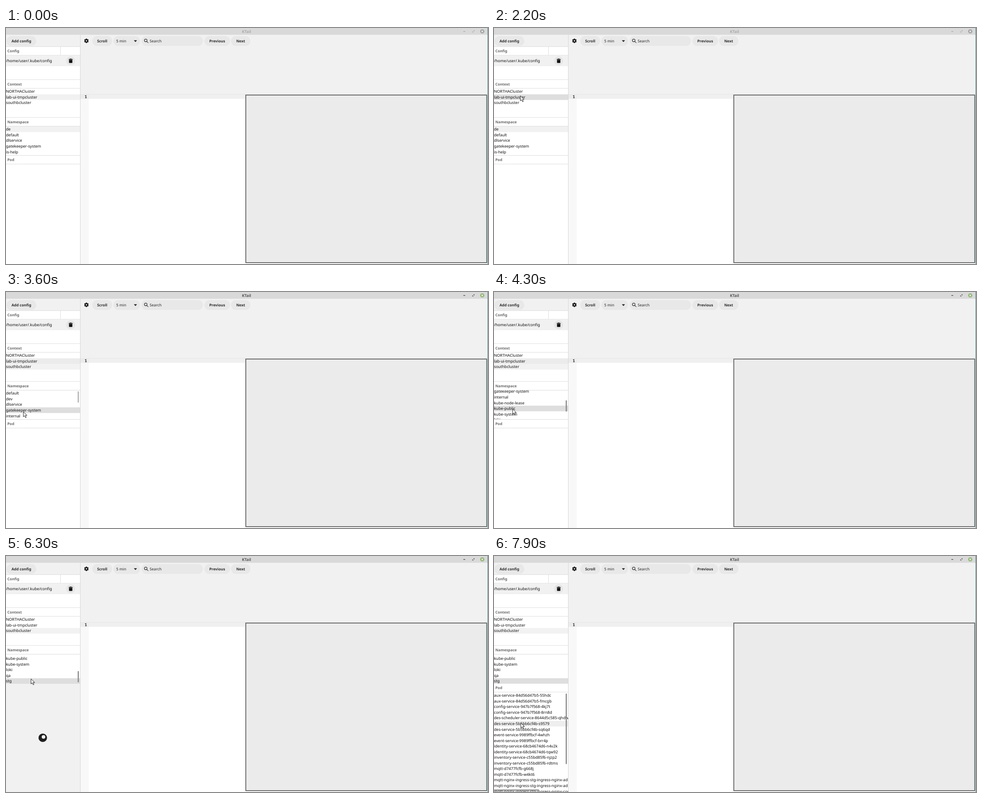
Recreate the animation shown at these times as an HTML page. Size 1067 by 525 pixels, loop 8000 ms.

```html
<!DOCTYPE html>
<html lang="en">
<head>
<meta charset="utf-8">
<title>Log viewer</title>
<style>
  html, body { margin: 0; width: 100%; height: 100%; overflow: hidden; background: #f1f1f1; }
  svg { display: block; }
  text { font: 8.65px "Noto Sans", "Open Sans", sans-serif; fill: #0c0c0c; text-rendering: geometricPrecision; white-space: pre; }
  .tool { font-size: 8.35px; fill: #222; }
  .strong { font-size: 8.2px; font-weight: 600; fill: #2b2b2b; }
  .head { font-size: 8.15px; font-weight: 600; fill: #686868; }
</style>
</head>
<body>
<svg width="1067" height="525" viewBox="0 0 1067 525">
  <defs>
    <clipPath id="nsClip"><rect y="219" width="164" height="64.5"/></clipPath>
    <clipPath id="podClip"><rect y="303" width="164" height="222"/></clipPath>
  </defs>
  <g id="chrome"></g>
  <g id="live"></g>
</svg>
<script>
const LOOP = 8000, STEP = 100, ROW = 12.55;
const CONTEXT_TOP = 135, NS_TOP = 219, POD_TOP = 303.9;
const HOVER = "#dedede";
const contexts = ["NORTHACluster", "lab-ui-tmpcluster", "southbcluster"];
const firstNamespaces = ["de", "default", "dlservice", "gatekeeper-system", "is-help"];
const namespaces = ["default", "dev", "dlservice", "gatekeeper-system", "internal", "kube-node-lease",
  "kube-public", "kube-system", "loki", "qa", "stg"];
const pods = ["aux-service-84d56d47b5-55hdc", "aux-service-84d56d47b5-fmcgb",
  "config-service-947b7f568-4kj7t", "config-service-947b7f568-8rn8d",
  "des-scheduler-service-8644d5c585-qhdwx", "des-service-5b5bb6cf4b-s9579", "des-service-5b5bb6cf4b-sq6qd",
  "event-service-9989ffbcf-4whzh", "event-service-9989ffbcf-brr4p",
  "identity-service-68cb4674d6-n4v2k", "identity-service-68cb4674d6-tqw92",
  "inventory-service-c55bd85f6-njzp2", "inventory-service-c55bd85f6-rdtms",
  "mqtt-d7477fcfb-g668j", "mqtt-d7477fcfb-w4kt6",
  "mqtt-nginx-ingress-stg-ingress-nginx-admission", "mqtt-nginx-ingress-stg-ingress-nginx-admission",
  "mqtt-nginx-ingress-stg-ingress-nginx-controller"];

// Keyframes: [time, ...values], linear in between
const cursorKeys = [[1400, 10, 163], [1700, 48, 158], [1800, 48, 158], [2200, 58, 150.5], [3100, 58, 150.5],
  [3300, 54, 170], [3600, 38, 266], [3700, 38, 265], [3800, 38, 265], [4300, 41, 260], [4400, 41, 260],
  [4700, 50, 260], [4800, 50, 260], [5000, 57, 261], [5600, 57, 261], [6100, 55, 273], [6500, 55, 273],
  [6600, 37, 275], [7100, 37, 275], [7900, 59, 371]];
const scrollKeys = [[3800, 0], [4300, 41.5], [4400, 41.5], [4700, 62], [4800, 62], [5000, 72.6]];
const overshootKeys = [[5200, 0], [5300, 20], [6000, 0]];
const nsBarKeys = [[3400, 0], [3700, 1], [6900, 1], [7000, 0], [7100, 0], [7200, .7], [7600, 0]];
const podBarKeys = [[7200, 0], [7500, 1]];

function track(keys, t) {
  const next = keys.findIndex(k => k[0] > t);
  if (next === 0) return keys[0].slice(1);
  if (next < 0) return keys[keys.length - 1].slice(1);
  const a = keys[next - 1], b = keys[next], p = (t - a[0]) / (b[0] - a[0]);
  return a.slice(1).map((v, i) => v + (b[i + 1] - v) * p);
}

const rect = (x, y, w, h, fill, extra = "") =>
  `<rect x="${x}" y="${y}" width="${w}" height="${h}" fill="${fill}" ${extra}/>`;
const text = (x, y, s, cls = "", extra = "") => `<text x="${x}" y="${y}" class="${cls}" ${extra}>${s}</text>`;
const circle = (x, y, r, fill) => `<circle cx="${x}" cy="${y}" r="${r}" fill="${fill}"/>`;
const path = (d, extra) => `<path d="${d}" ${extra}/>`;
const rule = y => rect(0, y, 164, .8, "#d4d4d4");
const pill = (x, w) => rect(x, 18, w, 22, "#e8e8e8", 'rx="11"');
const button = (x, w, label) =>
  pill(x, w) + text(x + w / 2, 32, label, "strong", 'text-anchor="middle"');
const header = (top, label) =>
  rect(0, top, 164, 20, "#fff") + rule(top) + rule(top + 19.4) + text(3, top + 13.2, label, "head");

function list(items, top, fills = {}) {
  return items.map((item, i) => {
    const y = top + i * ROW;
    return (fills[i] ? rect(0, y, 164, ROW, fills[i]) : "") + text(0, y + 9.3, item);
  }).join("");
}

function gear(x, y) {
  let teeth = "";
  for (let i = 0; i < 3; i++)
    teeth += rect(x - 1.4, y - 4.9, 2.8, 9.8, "#111", `transform="rotate(${i * 60} ${x} ${y})"`);
  return teeth + circle(x, y, 3.5, "#111") + circle(x, y, 1.6, "#f1f1f1");
}

function drawChrome() {
  const trash = rect(138.9, 69, 8.6, 1.4, "#111") + rect(141.3, 68.2, 3.8, 1.4, "#111") +
    path("M139.5 71.1h7.4v5.5q0 1.2-1.2 1.2h-5q-1.2 0-1.2-1.2z", 'fill="#111"');
  return rect(0, 0, 1067, 525, "#f1f1f1") + rect(0, 0, 1067, 15, "#d9d9d9") +
    rect(0, 41, 164, 484, "#fff") + button(1, 66, "Add config") +
    header(41, "Config") + rect(120.3, 42, .8, 18, "#d4d4d4") +
    rect(0, 61, 164, 24, "#f1f1f1") + text(0, 76, "/home/user/.kube/config") +
    circle(143, 73, 10, "#e6e6e6") + trash +
    header(114.4, "Context") + header(198.6, "Namespace") +
    gear(178, 28.5) + button(191, 44, "Scroll") +
    pill(238, 59) + text(244, 32, "5 min", "tool") + path("M283 27.2h7l-3.5 4z", 'fill="#222"') +
    pill(300, 136) + text(318, 32, "Search", "tool") +
    path("M311.4 29.6L315 33.2M312.3 27.6a3 3 0 1 1-6 0a3 3 0 1 1 6 0", 'fill="none" stroke="#333" stroke-width="1.2"') +
    button(439, 57, "Previous") + button(498, 43, "Next") +
    rect(165, 147, 901, .8, "#d8d8d8") + rect(165, 147.8, 901, 378, "#fff") +
    rect(165, 147.8, 18, 378, "#f8f8f8") + rect(165, 147.8, 18, 9.7, "#ebebeb") +
    rect(183, 147.8, 347, 9.7, "#f0f0f0") +
    text(174, 156, "1", "strong", 'style="font-family:\'Noto Sans Mono\',monospace;font-size:9px;font-weight:700"') +
    rect(530.8, 149.2, 533.4, 372.8, "#ebebeb", 'stroke="#5e5e5e" stroke-width="1.8"') +
    rect(164, 15, 1, 510, "#d6d6d6") + rect(1066, 0, 1, 525, "#4d8588");
}

function titleBar(active) {
  const ink = active ? "#3c3c3c" : "#a4a4a4";
  return text(532.5, 11, "KTail", "strong", `text-anchor="middle" style="fill:${active ? "#555" : "#aaa"};font-size:8.6px"`) +
    rect(1012.5, 7, 4, 1.3, ink) +
    path("M1034.3 5.2h2.7v2.7zM1032.4 7.1v2.7h2.7z", `fill="${ink}"`) +
    circle(1054.3, 7.5, 4.6, active ? "#92b372" : "#a0a0a0") +
    path("M1052.5 5.7l3.6 3.6m0-3.6l-3.6 3.6", 'stroke="#fff" stroke-width="1.1"');
}

const thumb = (x, y, w, h, opacity) => rect(x, y, w, h, "#8a8a8a", `rx="1.2" opacity="${opacity}"`);
const pointer = (x, y) => path("M.4 .4v11.2l2.6-2.4 2.1 4.4 1.9-.9-2.1-4.3h3.6z",
  `transform="translate(${x} ${y})" fill="#fff" stroke="#111" stroke-width=".9"`);

function contextList(t, hover) {
  const fills = {};
  if (t < 6200) fills[1] = t < 2500 ? "#f1f1f1" : "#ebebeb";
  if (t >= 3300) fills[2] = "#f2f2f2";
  if (hover >= 0 && hover < 3) fills[hover] = HOVER;
  return list(contexts, CONTEXT_TOP, fills);
}

function namespaceList(t, y) {
  const [scroll] = track(scrollKeys, t), [over] = track(overshootKeys, t), [bar] = track(nsBarKeys, t);
  const reloaded = t >= 2600, fills = {};
  if (!reloaded) fills[0] = "#f1f1f1";
  if (y >= NS_TOP && y < 284) fills[Math.floor((y - NS_TOP + scroll) / ROW)] = HOVER;
  if (t >= 6200) fills[10] = HOVER;
  return `<g clip-path="url(#nsClip)">` +
    list(reloaded ? namespaces : firstNamespaces, NS_TOP - scroll, fills) +
    thumb(158.7, 221 + scroll * .482, 2.6, 25, bar) +
    `<ellipse cx="82" cy="284" rx="${82 + over * 3.2}" ry="${over}" fill="#3584e4" opacity=".3"/></g>`;
}

function podPane(t, y) {
  if (t >= 6200 && t < 6400) {
    const turn = (t - 6300) * .6;
    return rect(0, 284, 164, 241, "#f1f1f1") + rule(283) + circle(81.4, 404.4, 9.4, "#1e1e1e") +
      `<g transform="rotate(${turn} 81.4 404.4)">${circle(83, 402.6, 4, "#f1f1f1")}</g>`;
  }
  if (t < 6400) return header(283, "Pod");
  const [bar] = track(podBarKeys, t), fills = {};
  if (y >= POD_TOP) fills[Math.floor((y - POD_TOP) / ROW)] = "#eeeeee";
  return header(283, "Pod") + `<g clip-path="url(#podClip)">${list(pods, POD_TOP, fills)}` +
    thumb(158.7, 306, 2.6, 157, bar) + thumb(0, 519.4, 100, 2.6, bar) + "</g>";
}

function drawLive(t) {
  const [x, y] = track(cursorKeys, t), visible = t >= 1400;
  const cursorY = visible ? y : -1;
  const hover = Math.floor((cursorY - CONTEXT_TOP) / ROW);
  return titleBar(t >= 2500) + contextList(t, hover) + namespaceList(t, cursorY) +
    podPane(t, cursorY) + (visible ? pointer(x, y) : "");
}

const live = document.getElementById("live");
document.getElementById("chrome").innerHTML = drawChrome();
const start = performance.now();
let shown = -1;
function frame() {
  const t = Math.floor((performance.now() - start) % LOOP / STEP) * STEP;
  if (t !== shown) live.innerHTML = drawLive(shown = t);
  requestAnimationFrame(frame);
}
frame();
</script>
</body>
</html>
```
